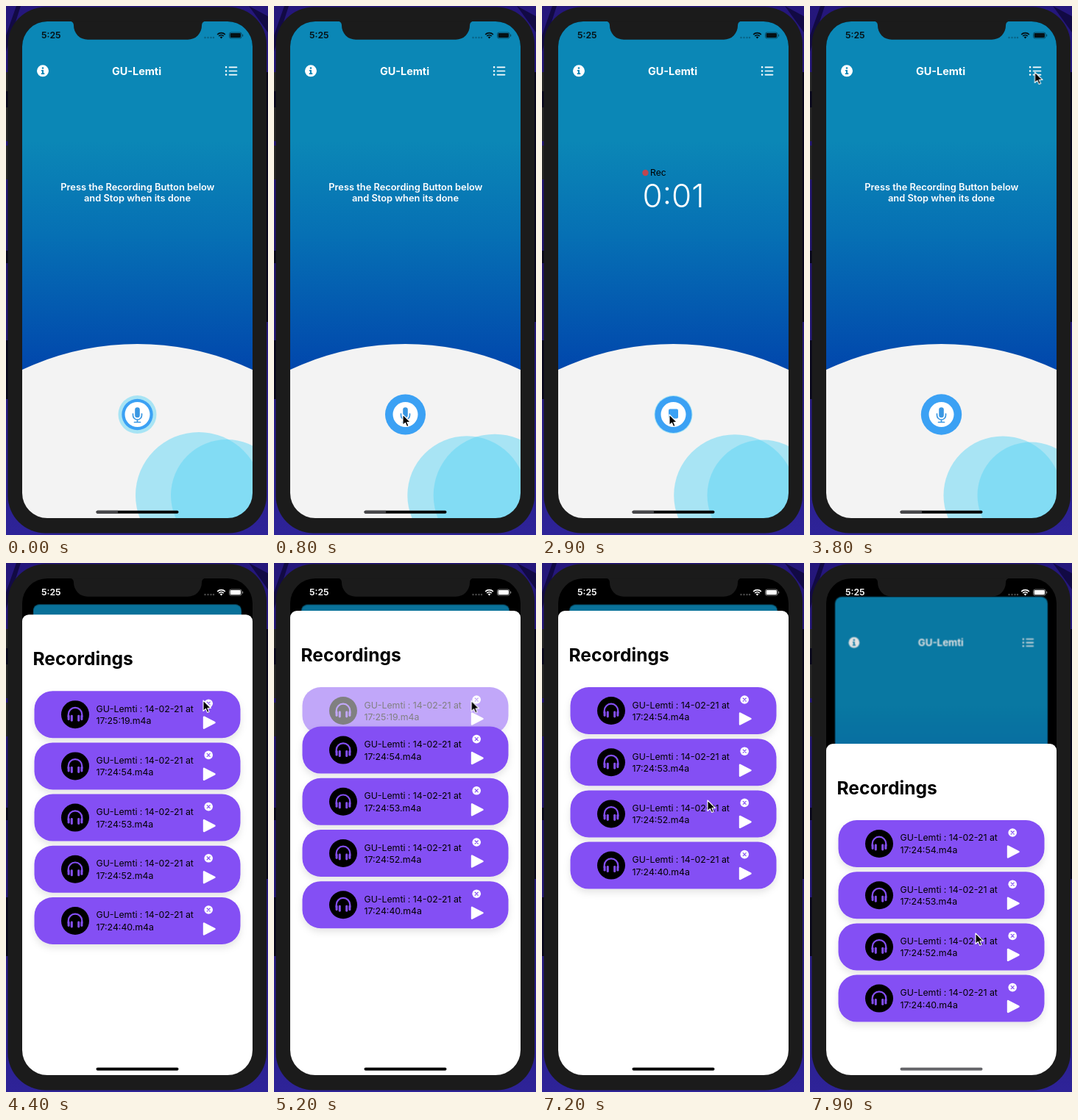
These frames come from a looping animation (356 px wide and 720 px high, 8000 ms). An HTML page:

```html
<!DOCTYPE html>
<html lang="en">
<head>
<meta charset="utf-8">
<title>Voice recorder</title>
<style>
  html, body { margin: 0; width: 100%; height: 100%; overflow: hidden; background: #281a88; }
  svg { display: block; width: 356px; height: 720px; font-family: Inter, Roboto, sans-serif; }

  /* Every part shares one 8 s loop: 1% = 80 ms */
  .anim { animation: 8s linear infinite; }
  .sine { animation-timing-function: cubic-bezier(.37, 0, .63, 1); }
  .step { animation-timing-function: step-end; }

  .ring { animation-name: ring; }
  @keyframes ring {
    0%, 28.75%, 58.75%, 100% { r: 21.2px; }
    13.75%, 43.75% { r: 28.8px; }
  }
  .bubble1 { animation-name: bubble1; }
  @keyframes bubble1 {
    0%, 28.75%, 58.75%, 100% { r: 86px; }
    13.75%, 43.75% { r: 79.6px; }
  }
  .bubble2 { animation-name: bubble2; }
  @keyframes bubble2 {
    0% { r: 76px; animation-timing-function: cubic-bezier(.3, .6, .6, 1); }
    16.25% { r: 84.5px; }
    46.25% { r: 72.5px; }
    100% { r: 76px; }
  }

  .idle { animation-name: idle; }
  @keyframes idle { 0%, 37.5%, 100% { opacity: 1; } 12.5% { opacity: 0; } }
  .recording { animation-name: recording; }
  @keyframes recording { 0%, 37.5%, 100% { opacity: 0; } 12.5% { opacity: 1; } }
  .sec0 { animation-name: sec0; }
  @keyframes sec0 { 0% { opacity: 1; } 25%, 100% { opacity: 0; } }
  .sec1 { animation-name: sec1; }
  @keyframes sec1 { 0% { opacity: 0; } 25%, 100% { opacity: 1; } }

  .sheet { animation-name: sheet; }
  @keyframes sheet {
    0% { transform: translateY(700px); }
    48.75% { transform: translateY(700px); animation-timing-function: cubic-bezier(.2, .8, .2, 1); }
    57% { transform: translateY(65px); }
    91.25% { transform: translateY(65px); animation-timing-function: ease-in-out; }
    98.75%, 100% { transform: translateY(246px); }
  }
  .home { transform-origin: 178.5px 21px; animation-name: home; }
  @keyframes home {
    0% { transform: translateY(0) scale(1); }
    48.75% { transform: translateY(0) scale(1); animation-timing-function: cubic-bezier(.2, .8, .2, 1); }
    57% { transform: translateY(35.5px) scale(.904); }
    91.25% { transform: translateY(35.5px) scale(.904); animation-timing-function: ease-in-out; }
    98.75%, 100% { transform: translateY(25px) scale(.924); }
  }
  .dim { animation-name: dim; }
  @keyframes dim {
    0%, 48.75% { opacity: 0; }
    54%, 91.25% { opacity: .16; }
    98.75%, 100% { opacity: .11; }
  }
  .status { animation-name: status; }
  @keyframes status { 0% { color: #051014; } 50%, 100% { color: #fff; } }
  .grip { animation-name: grip; }
  @keyframes grip { 0%, 91.25% { fill: #000; } 98.75%, 100% { fill: #66666a; } }
  .gripend { animation-name: gripend; }
  @keyframes gripend { 0% { opacity: 1; } 52.5%, 100% { opacity: 0; } }

  .gone { animation-name: gone; }
  @keyframes gone { 0%, 63.75% { opacity: 1; } 66.25%, 100% { opacity: 0; } }
  .rest { animation-name: rest; }
  @keyframes rest {
    0% { transform: none; }
    63.75% { transform: translateY(0); animation-timing-function: ease-in-out; }
    67.5%, 100% { transform: translateY(-70.2px); }
  }

  .cursor { animation-name: cursor, show; animation-timing-function: ease-in-out, step-end; }
  @keyframes show { 0% { opacity: 0; } 3.75%, 100% { opacity: 1; } }
  @keyframes cursor {
    0%, 3.75% { transform: translate(300px, 640px); }
    8.75%, 12.5% { transform: translate(175px, 556px); }
    26.25%, 37.5% { transform: translate(173px, 556px); }
    46.25%, 50% { transform: translate(305.5px, 90px); }
    53.75%, 64% { transform: translate(268px, 187px); }
    75%, 83.75% { transform: translate(276px, 211px); }
    90%, 91.25% { transform: translate(225px, 323px); }
    98.75%, 100% { transform: translate(225px, 504px); }
  }

  .name { font-size: 12.3px; }
  .semi { font-weight: 600; }
  .bold { font-weight: 700; }
  .mid { text-anchor: middle; }
  .line { fill: none; stroke-linecap: round; }
</style>
</head>
<body>
<svg viewBox="0 0 356 720">
  <defs>
    <linearGradient id="edge" x2="0" y2="1">
      <stop stop-color="#25177c"/><stop offset=".5" stop-color="#20146c"/><stop offset="1" stop-color="#2e2398"/>
    </linearGradient>
    <linearGradient id="sky" x2="0" y2="1">
      <stop offset=".24" stop-color="#0b87b6"/><stop offset=".43" stop-color="#0670b4"/>
      <stop offset=".7" stop-color="#0147ac"/>
    </linearGradient>
    <clipPath id="screen"><rect x="22" y="21" width="313" height="676" rx="34"/></clipPath>
    <clipPath id="card"><rect x="22" y="21" width="313" height="676" rx="10"/></clipPath>
    <filter id="soft" x="-10%" y="-20%" width="120%" height="160%">
      <feDropShadow dx="0" dy="5" stdDeviation="5" flood-opacity=".1"/>
    </filter>

    <g id="tile">
      <rect x="38.5" width="280" height="64" rx="25" fill="#844ff4" filter="url(#soft)"/>
      <circle cx="94" cy="32" r="19"/>
      <path class="line" d="M84.700 35V32a9.300 9.300 0 0 1 18.600 0V35" stroke="#844ff4" stroke-width="2.2"/>
      <g fill="#844ff4">
        <rect x="83.600" y="32.500" width="3" height="7.500" rx="1.400"/><rect x="87.800" y="32.500" width="3" height="9" rx="1.400"/>
        <rect x="97.200" y="32.500" width="3" height="9" rx="1.400"/><rect x="101.400" y="32.500" width="3" height="7.500" rx="1.400"/>
      </g>
      <circle cx="275.200" cy="17" r="5.800" fill="#fff"/>
      <path class="line" d="M273.200 15l4 4m0-4l-4 4" stroke="#844ff4" stroke-width="1.200"/>
      <path d="M269 35.500v15l14.500-7.500z" fill="#fff" stroke="#fff" stroke-width="2.400" stroke-linejoin="round"/>
    </g>
  </defs>

  <!-- Desktop and phone body -->
  <rect width="356" height="720" fill="url(#edge)"/>
  <path d="M0 40L14 0H20L0 62zM330 0l26 36V14z" fill="#120a44"/>
  <path d="M0 90h4v26H0zM0 138h4v46H0zM0 190h4v46H0z" fill="#262626"/>
  <path d="M0 116h4v22H0zM0 333h4v17H0zM0 455h4v80H0zM353 90h3v340h-3z" fill="#08061c"/>
  <rect x="2.500" y="1.500" width="351.500" height="716" rx="51" fill="#1b1b1b"/>

  <g clip-path="url(#screen)">
    <rect x="22" y="21" width="313" height="676"/>

    <g class="anim home">
      <g clip-path="url(#card)">
        <rect x="22" y="21" width="313" height="676" fill="url(#sky)"/>

        <!-- Navigation bar -->
        <circle cx="50" cy="88.300" r="8" fill="#fff"/>
        <g fill="#0b87b6">
          <circle cx="50" cy="84.500" r="1.300"/>
          <path d="M48 87h3v4.300h1.300V93H47.800v-1.700H49v-2.600h-1z"/>
        </g>
        <text class="bold mid" x="177.500" y="93.500" font-size="14.400" fill="#fff">GU-Lemti</text>
        <path class="line" d="M299 83.300h.1M299 88.500h.1M299 93.600h.1" stroke="#fff" stroke-width="2.500"/>
        <path class="line" d="M303.500 83.300h10M303.500 88.500h10M303.500 93.600h10" stroke="#fff" stroke-width="1.700"/>

        <!-- Prompt or timer -->
        <g class="anim step idle semi mid" font-size="12.850" fill="#fff">
          <text x="178.800" y="250.700">Press the Recording Button below</text>
          <text x="178.500" y="266.300">and Stop when its done</text>
        </g>
        <g class="anim step recording">
          <circle cx="140.500" cy="227" r="4.200" fill="#bf4650"/>
          <text x="147" y="231" font-size="12.200">Rec</text>
          <g font-size="44" font-weight="300" fill="#fff">
            <text class="anim step sec0" x="136.500" y="274">0:00</text>
            <text class="anim step sec1" x="136.500" y="274">0:01</text>
          </g>
        </g>

        <!-- Dome and bubbles -->
        <circle cx="178.500" cy="827" r="367" fill="#f3f3f3"/>
        <g fill="#5fd6f6" fill-opacity=".5">
          <circle class="anim sine bubble1" cx="262" cy="666" r="86"/>
          <circle class="anim sine bubble2" cx="300" cy="666" r="76"/>
          <circle cx="178.500" cy="556" r="26"/>
        </g>

        <!-- Record button -->
        <circle class="anim sine ring" cx="178.500" cy="556" r="21" fill="#3ba1f4"/>
        <circle cx="178.500" cy="556" r="17" fill="#fff"/>
        <g class="anim step idle">
          <rect x="175.200" y="546.300" width="6.600" height="14" rx="3.300" fill="#3a97e2"/>
          <path class="line" d="M172.500 555v2a6 6 0 0 0 12 0v-2M178.500 563v3.500M174.500 566.500h8" stroke="#3a97e2" stroke-width="1.700"/>
        </g>
        <rect class="anim step recording" x="172" y="548.500" width="13" height="13" rx="2" fill="#3ba1f4"/>
      </g>
      <rect class="anim dim" x="22" y="21" width="313" height="676" rx="10"/>
    </g>

    <!-- Recordings sheet -->
    <g class="anim sheet">
      <rect x="22" width="313" height="720" rx="9" fill="#fff"/>
      <text class="bold" x="36.500" y="69" font-size="24.600">Recordings</text>
      <g id="first" class="anim gone"></g>
      <g id="rest" class="anim rest"></g>
    </g>

    <!-- Home indicator -->
    <rect class="anim grip" x="122.500" y="686.800" width="112" height="4" rx="2"/>
    <path class="anim step gripend" d="M124.500 686.800H152v4h-27.500a2 2 0 0 1 0-4z" fill="#47474a"/>
  </g>

  <!-- Notch and status bar -->
  <path d="M86 20.500q6 .5 6 6a19 19 0 0 0 19 19.300H247a19 19 0 0 0 19-19.300q0-5.500 6-6z" fill="#1b1b1b"/>
  <g class="anim step status" fill="currentColor">
    <text class="semi" x="48" y="44.300" font-size="12.300">5:25</text>
    <g opacity=".3">
      <circle cx="270.500" cy="43" r="1.200"/><circle cx="274.500" cy="43" r="1.200"/>
      <circle cx="278.500" cy="43" r="1.200"/><circle cx="282" cy="43" r="1.200"/>
    </g>
    <path d="M290.600 42.300a3 3 0 0 1 3.800 0l-1.900 2.200z"/>
    <path fill="none" stroke="currentColor" stroke-width="1.700" d="M287.200 38.900a7.500 7.500 0 0 1 10.600 0M289.200 41a4.700 4.700 0 0 1 6.600 0"/>
    <rect x="303.500" y="36" width="16.500" height="8" rx="2.300" fill="none" stroke="currentColor" stroke-opacity=".5"/>
    <rect x="304.600" y="37.100" width="14.300" height="5.800" rx="1.300"/>
    <rect x="321" y="38.500" width="1.200" height="3" rx=".6" opacity=".5"/>
  </g>

  <path class="anim cursor" d="M0 0V14.500L3.400 11.400 5.600 16.400 8 15.400 5.900 10.500H10.400Z"
        stroke="#fff" stroke-width="1.100" stroke-linejoin="round"/>
</svg>
<script>
  const pitch = 70.2;
  const times = ["17:25:19", "17:24:54", "17:24:53", "17:24:52", "17:24:40"];
  const rows = times.map((time, i) => `
    <g transform="translate(0 ${104 + i * pitch})">
      <use href="#tile"/>
      <text class="name" x="122.500" y="28.500">GU-Lemti : 14-02-21 at</text>
      <text class="name" x="122.500" y="45">${time}.m4a</text>
    </g>`);
  document.getElementById("first").innerHTML = rows[0];
  document.getElementById("rest").innerHTML = rows.slice(1).join("");
</script>
</body>
</html>
```
